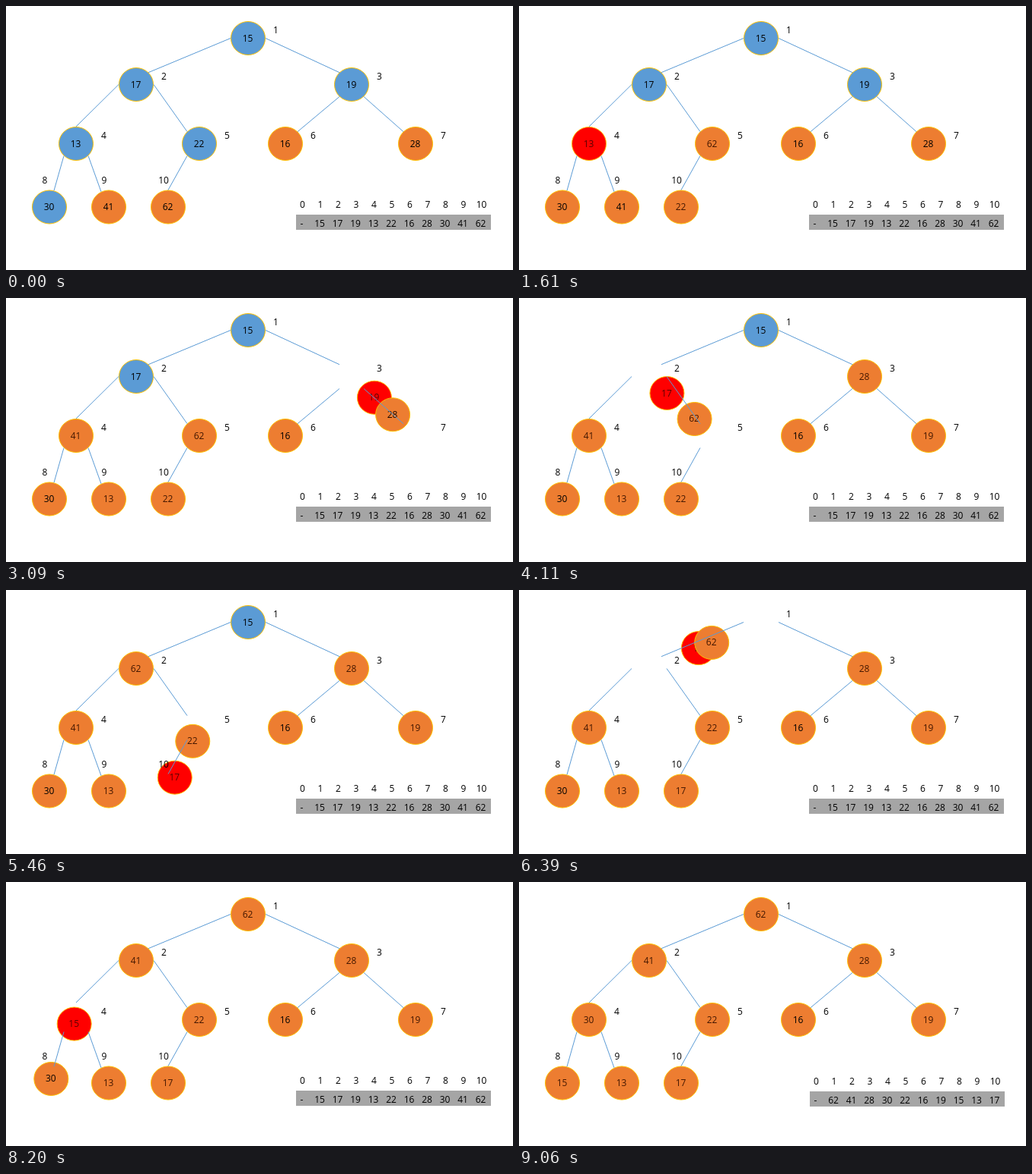
An HTML page that plays this animation: 666 px wide and 348 px high, repeating every 9.6 s.

```html
<!DOCTYPE html>
<html lang="en">
<head>
<meta charset="utf-8">
<title>Building a max heap</title>
<style>
  html, body { margin: 0; width: 100%; height: 100%; overflow: hidden; background: #fff; }
  svg { display: block; width: 666px; height: 348px; }
  text { font: 12px "Open Sans", "Noto Sans", sans-serif; text-anchor: middle; }
  ellipse { stroke: #ffc000; }
  line { stroke: #5b9bd5; }
</style>
</head>
<body>
<svg id="stage" viewBox="0 0 666 348"></svg>
<script>
const LOOP = 9600, FIRST = 619, PERIOD = 1063, MOVE = 850, LEAD = 169, FADE = 80;
const RX = 22.5, RY = 22;
const BLUE = [91, 155, 213], ORANGE = [237, 125, 49], RED = [255, 0, 0];
const BLACK = [0, 0, 0], BROWN = [69, 24, 0], MAROON = [90, 0, 0];

const values = [15, 17, 19, 13, 22, 16, 28, 30, 41, 62];
const lateLeaf = 30; // the only leaf that turns orange after the start
const columns = [318, 171, 454, 92, 254, 367, 538, 57, 135, 213];
const rows = [42.5, 103.5, 181.5, 265];
// Where the edge from the parent meets each disc, right of its centre.
const leans = [0, 16, -16, 0, -16, 16, -16, 6, -10, 0];

const rowOf = slot => Math.floor(Math.log2(slot));
const parentOf = slot => slot >> 1;
const home = slot => [columns[slot - 1], rows[rowOf(slot)]];

// Sift every parent down, from the last one to the root.
function heapify(list) {
  const heap = [null, ...list], steps = [];
  for (let root = parentOf(list.length); root; root--) {
    for (let up = root; 2 * up <= list.length;) {
      let low = 2 * up;
      if (heap[low + 1] > heap[low]) low++;
      if (heap[low] < heap[up]) break;
      const start = FIRST + PERIOD * steps.length;
      steps.push({ start, up, low, falling: heap[up], rising: heap[low] });
      [heap[up], heap[low]] = [heap[low], heap[up]];
      up = low;
    }
  }
  return { steps, sorted: heap.slice(1) };
}
const { steps, sorted } = heapify(values);

// Each falling value is red from just before its first swap to its last one.
const redSpans = new Map();
for (const { start, falling } of steps) {
  const from = redSpans.get(falling)?.from ?? start - LEAD;
  redSpans.set(falling, { from, to: start + MOVE });
}

const stage = document.getElementById('stage');
function add(parent, tag, attrs, content = '') {
  const el = document.createElementNS('http://www.w3.org/2000/svg', tag);
  for (const key in attrs) el.setAttribute(key, attrs[key]);
  el.textContent = content;
  return parent.appendChild(el);
}
const write = (parent, x, y, s) => add(parent, 'text', { x, y: y + 4 }, s);
const ramp = (t, start, length) => Math.min(1, Math.max(0, (t - start) / length));
const ease = p => (1 - Math.cos(Math.PI * p)) / 2;
const mix = (a, b, p) => a.map((v, i) => v + (b[i] - v) * p);
const rgb = c => `rgb(${c.map(Math.round)})`;

function drawArray(list, shift) {
  const group = add(stage, 'g', { transform: `translate(${shift} ${shift})` });
  add(group, 'rect', { x: 381, y: 275, width: 256, height: 20, fill: '#a5a5a5' });
  ['-', ...list].forEach((value, i) => {
    const x = 389.5 + 23.5 * i;
    write(group, x, 262, i);
    write(group, x - 1, 287, value);
  });
  return group;
}

function drawEdge(slot) {
  const [px, py] = home(parentOf(slot)), [x, y] = home(slot);
  const lean = leans[slot - 1], side = slot % 2 ? 1 : -1;
  // Wide branches leave from the side of the disc, lower ones diagonally.
  const [dx, dy] = parentOf(slot) < 3 ? [23, 0] : [16, 16];
  add(stage, 'line', {
    x1: px + side * dx, y1: py + dy,
    x2: x + lean, y2: y - Math.sqrt(RX * RX - lean * lean),
  });
}

function drawLabel(slot) {
  const [x, y] = home(slot);
  const [dx, dy] = rowOf(slot) === 3 ? [-6, -35] : [36.5, -10.5];
  write(stage, x + dx, y + dy, slot);
}

const nodes = new Map();
for (const value of values) {
  const group = add(stage, 'g');
  nodes.set(value, {
    group,
    disc: add(group, 'ellipse', { rx: RX, ry: RY }),
    digits: write(group, -.5, 0, value),
  });
}
// Rising values pass above the falling ones.
for (const value of redSpans.keys()) stage.prepend(nodes.get(value).group);
for (let slot = 2; slot <= values.length; slot++) drawEdge(slot);
for (let slot = 1; slot <= values.length; slot++) drawLabel(slot);
const oldArray = drawArray(values, 0);
const newArray = drawArray(sorted, 1);

function render(t) {
  const state = new Map(values.map((value, i) => {
    const isLeaf = 2 * (i + 1) > values.length;
    const warmth = value === lateLeaf ? ramp(t, FIRST - LEAD, FADE) : +isLeaf;
    return [value, { at: home(i + 1), fill: mix(BLUE, ORANGE, warmth), ink: BLACK }];
  }));

  for (const { start, up, low, falling, rising } of steps) {
    const p = ramp(t, start, MOVE);
    for (const [value, goal] of [[falling, low], [rising, up]]) {
      const node = state.get(value);
      node.at = mix(node.at, home(goal), ease(p));
      node.ink = mix(node.ink, BROWN, p);
    }
  }

  for (const [value, { from, to }] of redSpans) {
    const node = state.get(value);
    const on = ramp(t, from, FADE), off = ramp(t, to, FADE);
    node.fill = mix(mix(node.fill, RED, on), ORANGE, off);
    node.ink = mix(node.ink, MAROON, on - off);
  }

  for (const [value, { at, fill, ink }] of state) {
    const { group, disc, digits } = nodes.get(value);
    group.setAttribute('transform', `translate(${at})`);
    disc.setAttribute('fill', rgb(fill));
    digits.setAttribute('fill', rgb(ink));
  }

  const done = ramp(t, FIRST + PERIOD * (steps.length - 1) + MOVE, 140);
  oldArray.setAttribute('opacity', 1 - done);
  newArray.setAttribute('opacity', done);
}

const begin = performance.now();
function tick() {
  render((performance.now() - begin) % LOOP);
  requestAnimationFrame(tick);
}
tick();
</script>
</body>
</html>
```
